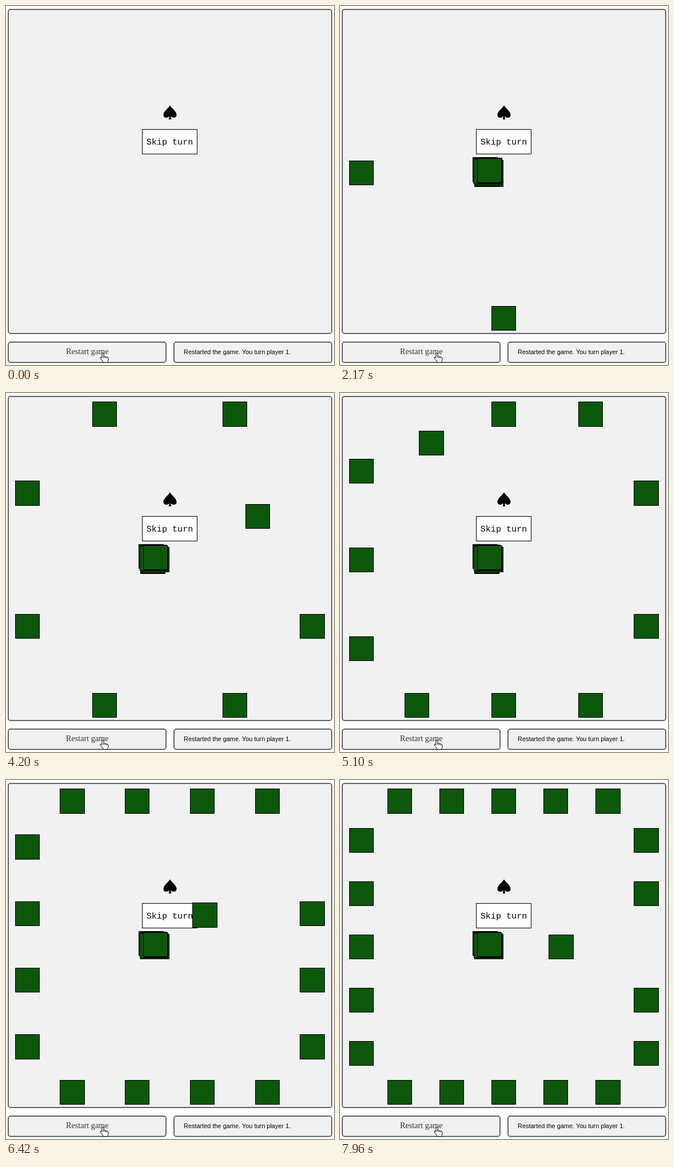
Recreate the animation shown at these times as an HTML page with a canvas. Size 574x627 px, loop 8 s.

```html
<!DOCTYPE html>
<html lang="en">
<head>
<meta charset="utf-8">
<title>Dealing cards</title>
<style>
  html, body { margin: 0; width: 574px; height: 627px; overflow: hidden; background: #fff; }
  svg, canvas { position: absolute; left: 0; top: 0; }
  .panel { fill: #f1f1f1; stroke: #333; stroke-width: 1.5; }
</style>
</head>
<body>
<svg width="574" height="627" viewBox="0 0 574 627">
  <rect class="panel" x="4" y="6" width="566" height="566" rx="4"/>
  <rect class="panel" x="4" y="587" width="276" height="35.5" rx="4"/>
  <rect class="panel" x="294" y="587" width="276" height="35.5" rx="4"/>
  <path d="M287 173.500C290 179 298.500 184 298.500 190C298.500 196 291.500 196.500 288.200 192.500Q288.400 196 289.500 198H284.500Q285.600 196 285.800 192.500C282.500 196.500 275.500 196 275.500 190C275.500 184 284 179 287 173.500Z"/>
  <rect x="238.5" y="215.5" width="96" height="43" fill="#fff" stroke="#000"/>
  <text x="286.5" y="242" text-anchor="middle" font-family="'Liberation Mono', monospace" font-size="15.1">Skip turn</text>
  <text x="142.3" y="608" text-anchor="middle" font-family="'Liberation Serif', serif" font-size="14.2" fill="#333">Restart game</text>
  <text x="311" y="608" font-family="'Liberation Sans', sans-serif" font-size="10.95">Restarted the game. You turn player 1.</text>
  <g fill="#fff" stroke="#000">
    <path d="M168 614.500V607.500q0-1.500 1.500-1.500t1.500 1.500v4.500q1.700-.9 2.700.6q1.600-.7 2.500.7q2.300-.4 2.800 1.500v3.200q0 1.500-1.200 3v1.500h-8v-1.500l-4.600-5.800q-.8-2 .8-2q1 0 2 1.500Z"/>
    <path d="M171 612v2.500M173.700 612.800v2M176.200 613.500v1.800" fill="none"/>
  </g>
</svg>
<canvas id="cards" width="574" height="627"></canvas>
<script>
const ctx = document.getElementById('cards').getContext('2d');
const LOOP = 8000, CARD = 42.4, DECK_SIZE = 36;
const LAUNCH = { x: 240, y: 270 };

// Key points of the dealing pace: time in ms, cards dealt by then.
const PACE = [[900, 0], [1720, 1], [2170, 2], [3280, 4.755], [4200, 7.65], [5930, 13.7], [7540, 19], [8000, 19.5]];

function cardsDealt(t) {
  if (t <= PACE[0][0]) return 0;
  const i = PACE.findIndex(([time]) => t <= time);
  const [t0, n0] = PACE[i - 1], [t1, n1] = PACE[i];
  return n0 + (n1 - n0) * (t - t0) / (t1 - t0);
}

// Loose pile, bottom card first; it gets tidier towards the top card.
const noise = n => { const v = Math.sin(n * 12.9898 + 4.1) * 43758.5453; return v - Math.floor(v); };
const deck = Array.from({ length: DECK_SIZE - 1 }, (_, i) => ({
  x: 232.5 + 11 * noise(i),
  y: 264.5 + (10 - 5 * i / DECK_SIZE) * noise(i + 50)
}));
deck.push({ x: 240, y: 266 });

// Hands in dealing order: bottom, left, top, right.
function place(hand, slot, count) {
  const shift = (slot - (count - 1) / 2) / count;
  const x = 265.46 + shift * 455.6, y = 270.2 + shift * 465.4;
  return [{ x, y: 524.2 }, { x: 16.3, y }, { x, y: 15.7 }, { x: 514.7, y }][hand];
}

// Hands are kept sorted, so a new card lands in a pseudo-random slot.
const landingSlot = (card, count) => (13 * card + 5) % count;

const mix = (a, b, p) => ({ x: a.x + (b.x - a.x) * p, y: a.y + (b.y - a.y) * p });

function drawCard({ x, y }) {
  const left = Math.floor(x), top = Math.floor(y);
  const w = Math.floor(x + CARD) - left, h = Math.floor(y + CARD) - top;
  ctx.fillRect(left, top, w + 1, h + 1);
  ctx.strokeRect(left + 0.5, top + 0.5, w, h);
}

function draw(t) {
  ctx.clearRect(0, 0, 574, 627);
  ctx.fillStyle = '#0d570d';
  ctx.strokeStyle = '#000';

  const dealt = cardsDealt(t), landed = Math.floor(dealt), taken = Math.ceil(dealt);
  for (let hand = 0; hand < 4; hand++) {
    const count = Math.floor((taken + 3 - hand) / 4);
    const receives = taken > landed && landed % 4 === hand;
    const open = receives ? landingSlot(landed, count) : -1;
    for (let slot = 0; slot < count; slot++) {
      const spot = place(hand, slot, count);
      drawCard(slot === open ? mix(LAUNCH, spot, dealt - landed) : spot);
    }
  }

  const stacked = Math.min(DECK_SIZE, Math.floor(t / 70) * 3);
  deck.slice(taken, stacked).forEach(drawCard);
}

const began = performance.now();
function tick() {
  draw((performance.now() - began) % LOOP);
  requestAnimationFrame(tick);
}
tick();
</script>
</body>
</html>
```
